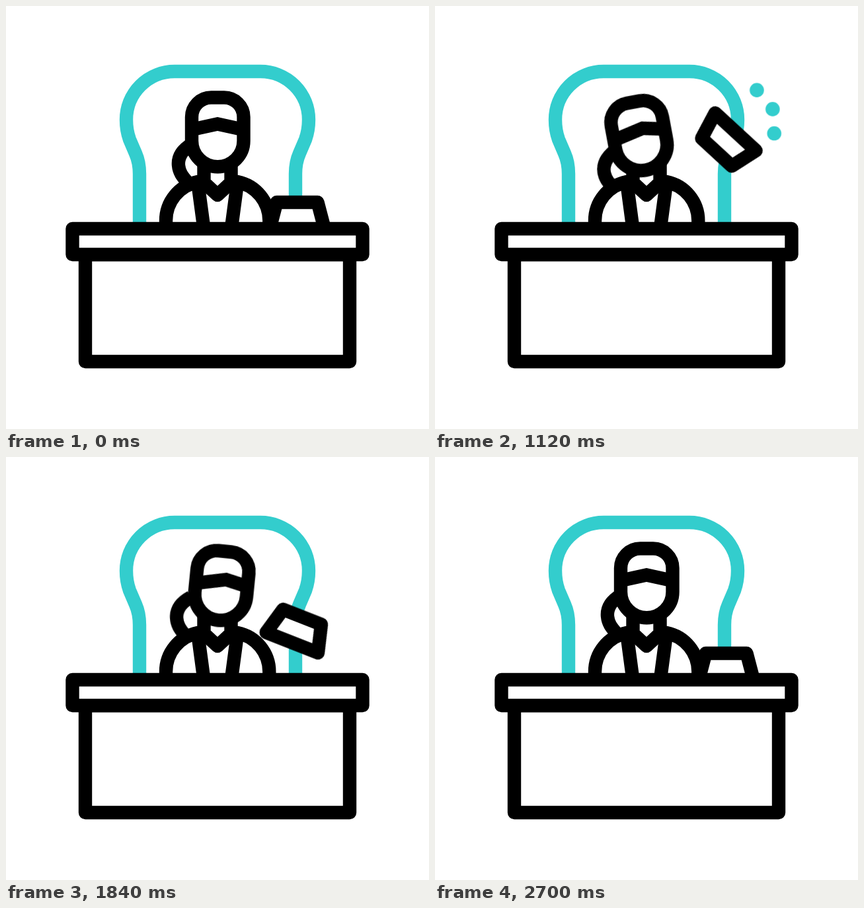
Write an HTML page without scripts that moves like this. It is 640 px wide and 640 px high and loops after 3 s.

```html
<!DOCTYPE html>
<html lang="en">
<head>
<meta charset="utf-8">
<title>Desk toss</title>
<style>
  html, body { margin: 0; width: 100%; height: 100%; overflow: hidden; background: #fff; }
  svg { display: block; width: 100vw; height: 100vh; }

  .line { fill: none; stroke: #000; stroke-width: 20.4; stroke-linejoin: round; }
  .solid { fill: #fff; }
  .teal { stroke: #33cdcd; }
  .fixed-width { vector-effect: non-scaling-stroke; }

  .head, .fringe, .bun, .lift, .spin, .squash, .spread {
    animation: 3s cubic-bezier(.333, 0, .667, 1) infinite;
  }
  .head { animation-name: head; transform-origin: 320px 250px; }
  .fringe { animation-name: fringe; }
  .bun { animation-name: bun; transform-origin: 266px 238px; }
  .lift { animation-name: lift; }
  .spin { animation-name: spin; transform-origin: 440.5px 318px; }
  .squash { animation-name: squash; transform-origin: 440.5px 339px; }
  .spread { animation-name: spread; transform-origin: 439px 305px; }
  .dots { stroke-linecap: round; animation: shrink 3s linear infinite; }

  /* The head follows the flying object */
  @keyframes head {
    0%, 7.333%, 90%, 100% { transform: translateY(0) rotate(0deg); }
    16.667%, 66.667% { transform: translateY(3.5px) rotate(8.2deg); }
    42.333% { transform: translateY(5.2px) rotate(-12.5deg); }
  }
  @keyframes fringe {
    0%, 7.333%, 90%, 100% { transform: translate(0, 0); }
    16.667%, 66.667% { transform: translate(6px, 2.5px); }
    42.333% { transform: translate(7px, 1.5px); }
  }
  @keyframes bun {
    0%, 7.333%, 90%, 100% { transform: translate(0, 0) rotate(0deg); }
    16.667%, 66.667% { transform: translate(-2.3px, 1px) rotate(4deg); }
    42.333% { transform: translate(-5.5px, 13px) rotate(-9deg); }
  }

  /* Toss: crouch, fly with one full turn, land */
  @keyframes lift {
    0%, 15.333% { transform: translateY(0); animation-timing-function: cubic-bezier(.28, 0, .7, 1); }
    45% { transform: translateY(-135.5px); animation-timing-function: cubic-bezier(.2, 0, .83, 1); }
    73.333%, 100% { transform: translateY(0); }
  }
  @keyframes spin {
    0%, 15.667% { transform: rotate(0deg); animation-timing-function: cubic-bezier(.42, .03, .69, .55); }
    45% { transform: rotate(-225deg); animation-timing-function: cubic-bezier(.2, .49, .5, 1); }
    74.667%, 100% { transform: rotate(-360deg); }
  }
  @keyframes squash {
    0%, 7.333%, 25.333%, 60%, 86.667%, 100% { transform: scale(1, 1); }
    15.333% { transform: scale(1.06, .84); }
    73.333% { transform: scale(1.1, .79); }
  }
  @keyframes spread {
    0%, 26% { transform: scale(0); animation-timing-function: cubic-bezier(.333, .667, .667, 1); }
    46.667%, 100% { transform: scale(1); }
  }
  @keyframes shrink {
    0%, 54.667% { stroke-width: 21.6px; }
    60%, 100% { stroke-width: 0; }
  }
</style>
</head>
<body>
<svg viewBox="0 0 640 640">
  <path class="line teal" d="M202 337V254C202 243 200 232 196 223L187 202Q182 188 182 172A73 73 0 0 1 255 99H385A73 73 0 0 1 458 172Q458 188 453 202L444 223C440 232 438 243 438 254V337"/>

  <path class="line bun" d="M281 209C266 218 260 229 261 241C262 252 267 258 274 266"/>

  <g class="line">
    <path d="M242 337V325A60 60 0 0 1 290 266L299.5 337"/>
    <path d="M398.3 337V325A60 60 0 0 0 350.3 266L340.8 337"/>
    <path d="M299.5 238V267L320 286L340.5 267V238"/>
  </g>

  <g class="head line">
    <path class="solid" d="M281 168A29.5 29.5 0 0 1 310.5 138.5H330A29.5 29.5 0 0 1 359.5 168V204A39.25 39.25 0 0 1 281 204Z"/>
    <path class="fringe" stroke-linejoin="miter" d="M281 187L320 178.5L359 187"/>
  </g>

  <g class="lift">
    <g class="spread">
      <path class="line teal dots fixed-width" d="M499 223h.01M529 259h.01M532 305h.01"/>
    </g>
    <g class="spin">
      <g class="squash">
        <path class="line solid fixed-width" d="M409.5 297H471.5L482.5 339H398.5Z"/>
      </g>
    </g>
  </g>

  <g class="line solid">
    <rect x="120" y="376" width="400" height="162"/>
    <rect x="100.5" y="337" width="439" height="39"/>
  </g>
</svg>
</body>
</html>
```
